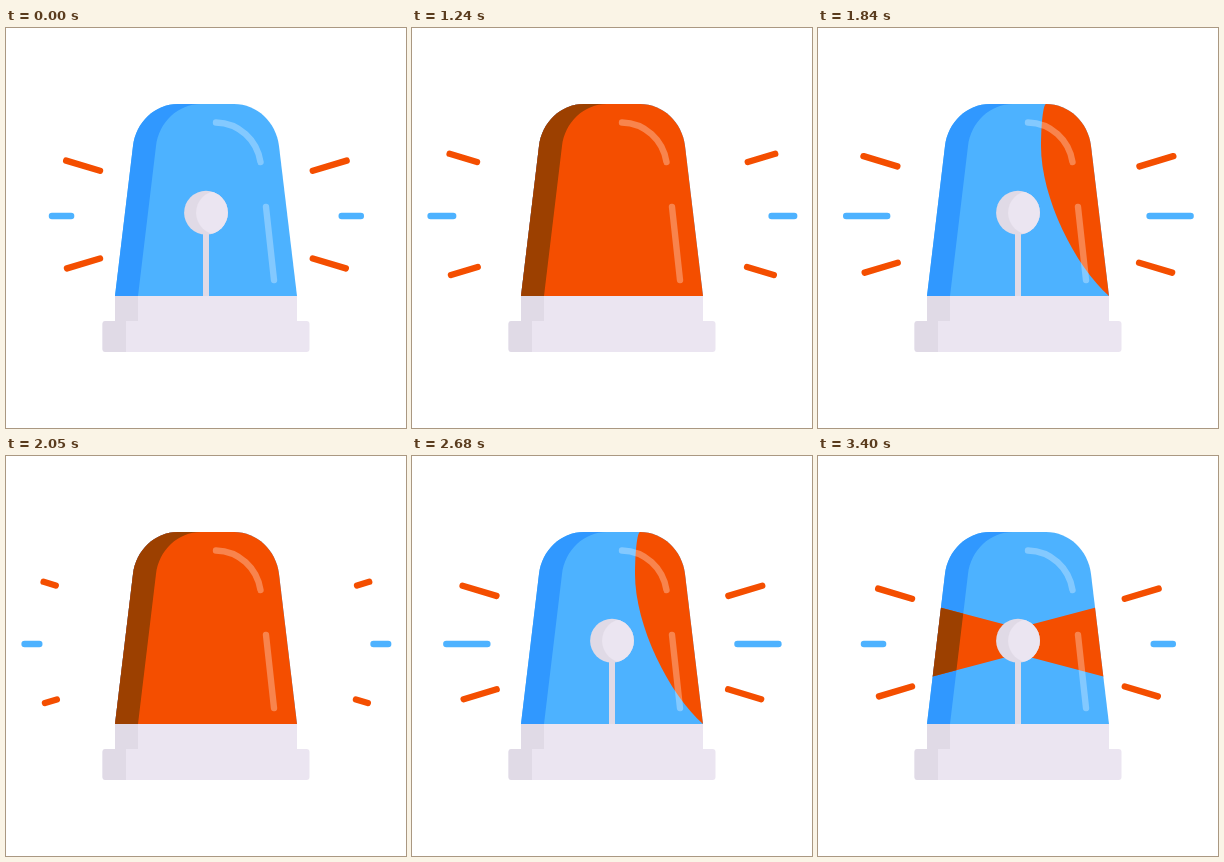
An HTML page with a canvas for the animation above (3.43 s loop, 400x400 px).

```html
<!DOCTYPE html>
<html lang="en">
<head>
<meta charset="utf-8">
<title>Siren</title>
<style>
  html, body { margin: 0; width: 100%; height: 100%; overflow: hidden; background: #fff; }
  canvas { display: block; width: 400px; height: 400px; }
</style>
</head>
<body>
<canvas id="stage" width="400" height="400"></canvas>
<script>
const ctx = document.getElementById('stage').getContext('2d');

const LOOP = 3430, REST = 1000, TICK = 30;
const BEATS_PER_TICK = 0.75;
const LIGHT_STARTS = [0, 19, 40];
const RAY_STARTS = [0, 18.4, 40.3, 60];

const BLUE = '#4db2ff', DEEP_BLUE = '#3098ff';
const ORANGE = '#f44e00', DEEP_ORANGE = '#9c4000';
const PALE = '#ebe5f1', SHADE = '#e0dae6';

const dome = new Path2D('M109 268L127 118C130 94 149 76 172 76H228C251 76 270 94 273 118L291 268Z');
const strip = new Path2D('M109 268L127 118C130 94 149 76 172 76H195C172 76 153 94 150 118L132 268Z');
const gloss = new Path2D('M210 94.5C233 95 251 112 254.500 134M260 179L268 252');

const clamp = (v, lo = 0, hi = 1) => Math.min(hi, Math.max(lo, v));
const lerp = (a, b, t) => a + (b - a) * t;
const progress = (p, from, to) => clamp((p - from) / (to - from));

function circle(x, y, r) {
  const path = new Path2D();
  path.arc(x, y, r, 0, Math.PI * 2);
  return path;
}

function fillClipped(clip, path, color) {
  ctx.save();
  ctx.clip(clip);
  ctx.fillStyle = color;
  ctx.fill(path);
  ctx.restore();
}

function glow(path) {
  fillClipped(dome, path, ORANGE);
  fillClipped(strip, path, DEEP_ORANGE);
}

function block(x, y, w, h, r, color) {
  ctx.fillStyle = color;
  ctx.beginPath();
  ctx.roundRect(x, y, w, h, r);
  ctx.fill();
}

// An edge of the light: x at the top, the shoulder and the bottom of the dome.
function edge(shoulder, side) {
  return { top: lerp(172, 228, side), mid: shoulder, low: lerp(109, 291, side) };
}

const outside = x => ({ top: x, mid: x, low: x });

function leadingEdge(p) {
  if (p >= 5.7) return outside(-100);
  return p < 3
    ? edge(lerp(273, 198, p / 3), 1)
    : edge(lerp(198, 127, progress(p, 3, 5.7)), 1 - progress(p, 3, 5.7));
}

function trailingEdge(p) {
  if (p <= 9.3) return outside(500);
  return p < 12
    ? edge(lerp(273, 202, progress(p, 9.3, 12)), 1 - progress(p, 9.3, 12))
    : edge(lerp(202, 127, progress(p, 12, 15)), 0);
}

function sweepPath(p) {
  const a = leadingEdge(p), b = trailingEdge(p);
  const path = new Path2D();
  path.moveTo(a.top, 76);
  path.bezierCurveTo(lerp(a.top, a.mid, 0.55), 76, a.mid, 96, a.mid, 118);
  path.bezierCurveTo(a.mid, 170, lerp(a.low, a.mid, 0.5), 238, a.low, 268);
  path.lineTo(b.low, 268);
  path.bezierCurveTo(lerp(b.low, b.mid, 0.5), 238, b.mid, 170, b.mid, 118);
  path.bezierCurveTo(b.mid, 96, lerp(b.top, b.mid, 0.55), 76, b.top, 76);
  path.closePath();
  return path;
}

function beamPath(p) {
  const reach = clamp(11.5 * (p - 10.1), 0, 100);
  const path = new Path2D();
  if (!reach) return path;
  const half = 13 + 0.265 * reach;
  for (const dir of [-1, 1]) {
    path.moveTo(200, 172);
    path.lineTo(200 + dir * reach, 185 - half);
    path.lineTo(200 + dir * reach, 185 + half);
    path.lineTo(200, 198);
    path.closePath();
  }
  return path;
}

function ray(x1, y1, x2, y2, from, to, color) {
  if (from >= 1 || to <= from) return;
  ctx.strokeStyle = color;
  for (const mirrored of [false, true]) {
    const at = t => {
      const x = lerp(x1, x2, t);
      return [mirrored ? 400.8 - x : x, lerp(y1, y2, t)];
    };
    ctx.beginPath();
    ctx.moveTo(...at(from));
    ctx.lineTo(...at(to));
    ctx.stroke();
  }
}

function drawRays(beat) {
  ctx.lineCap = 'round';
  ctx.lineWidth = 6.4;
  RAY_STARTS.forEach((start, i) => {
    let p = beat - start;
    if (p < -6 || (i === 0 && p < 0)) return;
    if (i === 0) p = p * p / (p + 1);
    const tail = clamp(p / 10), tip = clamp((p + 6) / 10);
    const resting = i === 0 || i === RAY_STARTS.length - 1;
    ray(94, 142.800, 37.6, 125.8, tail, tip, ORANGE);
    ray(94, 230.5, 39, 247, tail, tip, ORANGE);
    ray(87, 188, 18.6, 188, resting ? lerp(0.32, 1, tail) : tail, tip, BLUE);
  });
}

function draw(beat) {
  const start = LIGHT_STARTS.filter(s => s <= beat).pop();
  const p = beat - start;

  ctx.fillStyle = '#fff';
  ctx.fillRect(0, 0, 400, 400);
  drawRays(beat);

  ctx.fillStyle = BLUE;
  ctx.fill(dome);
  ctx.fillStyle = DEEP_BLUE;
  ctx.fill(strip);
  glow(beamPath(p));

  block(197, 200, 6, 68, 0, SHADE);
  const bulb = circle(200, 184.7, 21.9);
  ctx.fillStyle = SHADE;
  ctx.fill(bulb);
  fillClipped(bulb, circle(212, 184.7, 21.9), PALE);

  if (p > 0 && p < 15) glow(sweepPath(p));

  ctx.strokeStyle = 'rgba(255,255,255,0.3)';
  ctx.lineWidth = 6.4;
  ctx.stroke(gloss);

  block(109, 268, 182, 26, 0, PALE);
  block(109, 268, 23, 26, 0, SHADE);
  block(96.5, 293, 207, 31, 3, PALE);
  block(96.5, 293, 23.5, 31, [3, 0, 0, 3], SHADE);
}

const origin = performance.now();

function frame() {
  const time = (performance.now() - origin) % LOOP;
  const tick = Math.max(0, Math.floor((time - REST) / TICK));
  draw(tick * BEATS_PER_TICK);
  requestAnimationFrame(frame);
}

frame();
</script>
</body>
</html>
```
